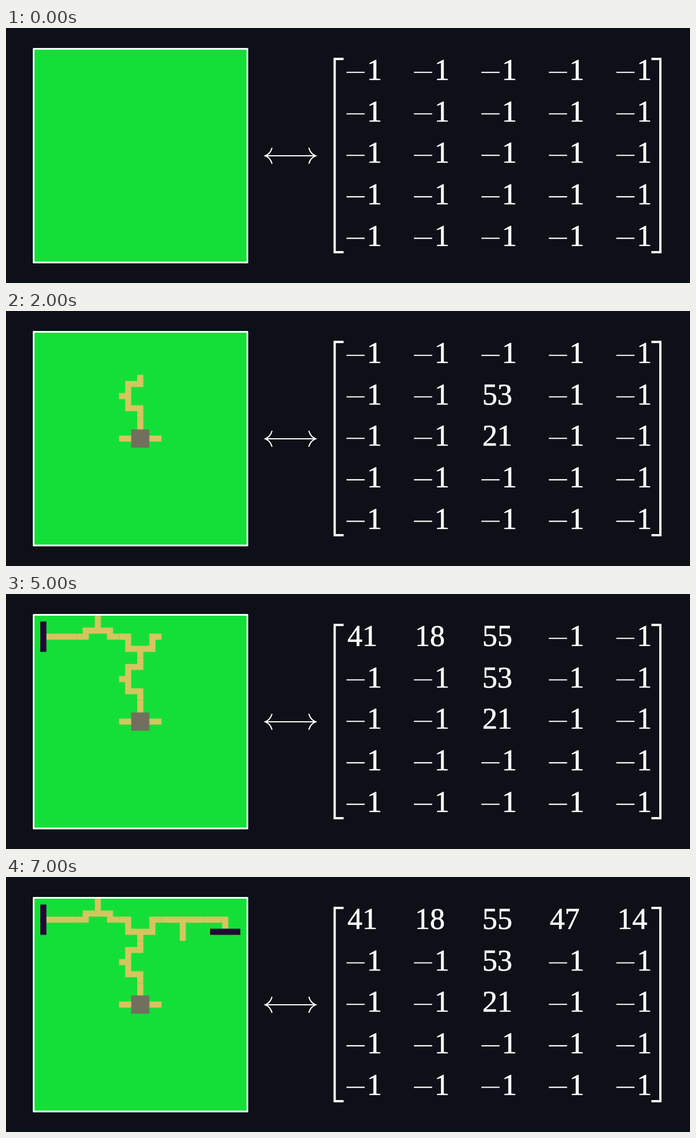
Recreate the animation shown at these times as an HTML page. Size 1200 px wide and 447 px high, loop 8000 ms.

```html
<!DOCTYPE html>
<html lang="en">
<head>
<meta charset="utf-8">
<title>Tile map and matrix</title>
<style>
  html, body { margin: 0; width: 100%; height: 100%; overflow: hidden; background: #0d1017; }
  svg { display: block; width: 100%; height: 100%; }
  text { font: 52.5px "Liberation Serif", "Times New Roman", serif; fill: #fff; stroke: #fff; stroke-width: .7; text-anchor: middle; }
  .line { fill: none; stroke: #fff; stroke-width: 2.1; }
  .path { fill: none; stroke: #d6c55f; }
  .wall { fill: none; stroke: #1e0a32; }
  .room { fill: none; stroke: #726f5f; stroke-width: 3; }
</style>
</head>
<body>
<svg viewBox="0 0 1200 447">
  <rect width="1200" height="447" fill="#0d1017"/>
  <rect x="48.5" y="36.5" width="375" height="374.5" fill="#14df38"/>
  <g id="map" transform="translate(49.5 37.5) scale(10.635)"></g>
  <rect class="line" x="48.5" y="36.5" width="375" height="374.5" style="stroke-width: 3" stroke-linejoin="round"/>
  <g id="arrow" transform="translate(499 224)"></g>
  <g id="brackets" transform="translate(862.3 223.6)"></g>
  <g id="matrix"></g>
</svg>
<script>
const LOOP = 8000;
const STEP = 1000;
const SIZE = 5;
const TILE = 7;

// One tile appears per step; strokes run through its 7 by 7 cells.
const tiles = [
  { row: 2, col: 2, value: 21, path: 'M0 3.5H7M3.5 0V3.5', room: 'M2 3.5H5' },
  { row: 1, col: 2, value: 53, path: 'M3.5 0V1.5H1.5V5.5H3.5V7M0 3.5H1.5' },
  { row: 0, col: 2, value: 55, path: 'M0 3.5H1.5V5.5H5.5V3.5H7M3.5 5.5V7' },
  { row: 0, col: 1, value: 18, path: 'M0 3.5H1.5V2.5H5.5V3.5H7M3.5 0V2.5' },
  { row: 0, col: 0, value: 41, path: 'M2 3.5H7', wall: 'M1.5 1V6' },
  { row: 0, col: 3, value: 47, path: 'M0 3.5H7M3.5 3.5V7' },
  { row: 0, col: 4, value: 14, path: 'M0 3.5H3.5V5', wall: 'M1 5.5H6' }
];

const byId = id => document.getElementById(id);

function add(parent, tag, attrs = {}, text = '') {
  const node = document.createElementNS('http://www.w3.org/2000/svg', tag);
  for (const [key, value] of Object.entries(attrs)) node.setAttribute(key, value);
  node.textContent = text;
  return parent.appendChild(node);
}

function addMirrored(parent, attrs) {
  for (const side of [1, -1]) {
    add(parent, 'path', { class: 'line', transform: `scale(${side} 1)`, ...attrs });
  }
}

function switchAt(node, time, before, after) {
  const offset = time / LOOP;
  node.animate([
    { opacity: before, offset: 0 }, { opacity: before, offset },
    { opacity: after, offset }, { opacity: after, offset: 1 }
  ], { duration: LOOP, iterations: Infinity });
}

function addEmptyEntry(x, y) {
  const entry = add(byId('matrix'), 'g');
  add(entry, 'path', { class: 'line', d: `M${x - 28.7} ${y - 13}h32` });
  add(entry, 'text', { x: x + 20.4, y }, '1');
  return entry;
}

function addTile({ row, col, ...strokes }) {
  const group = add(byId('map'), 'g', { transform: `translate(${TILE * col} ${TILE * row})` });
  for (const kind of ['path', 'room', 'wall']) {
    if (strokes[kind]) add(group, 'path', { class: kind, d: strokes[kind] });
  }
  return group;
}

addMirrored(byId('arrow'), { d: 'M0 0H-44M-32.5 -13.2C-34.5 -6.5 -39 -2 -44.2 0C-39 2 -34.5 6.5 -32.5 13.2', 'stroke-linecap': 'round' });
addMirrored(byId('brackets'), { d: 'M-270 -169.4H-285.7V169.4H-270', style: 'stroke-width: 4' });

for (let row = 0; row < SIZE; row++) {
  for (let col = 0; col < SIZE; col++) {
    const x = 626 + 118.35 * col;
    const y = 90.8 + 72.7 * row;
    const empty = addEmptyEntry(x, y);
    const index = tiles.findIndex(tile => tile.row === row && tile.col === col);
    if (index < 0) continue;
    const time = STEP * (index + 1);
    const number = add(byId('matrix'), 'text', { x: x - 0.7, y }, tiles[index].value);
    switchAt(empty, time, 1, 0);
    switchAt(number, time, 0, 1);
    switchAt(addTile(tiles[index]), time, 0, 1);
  }
}
</script>
</body>
</html>
```
